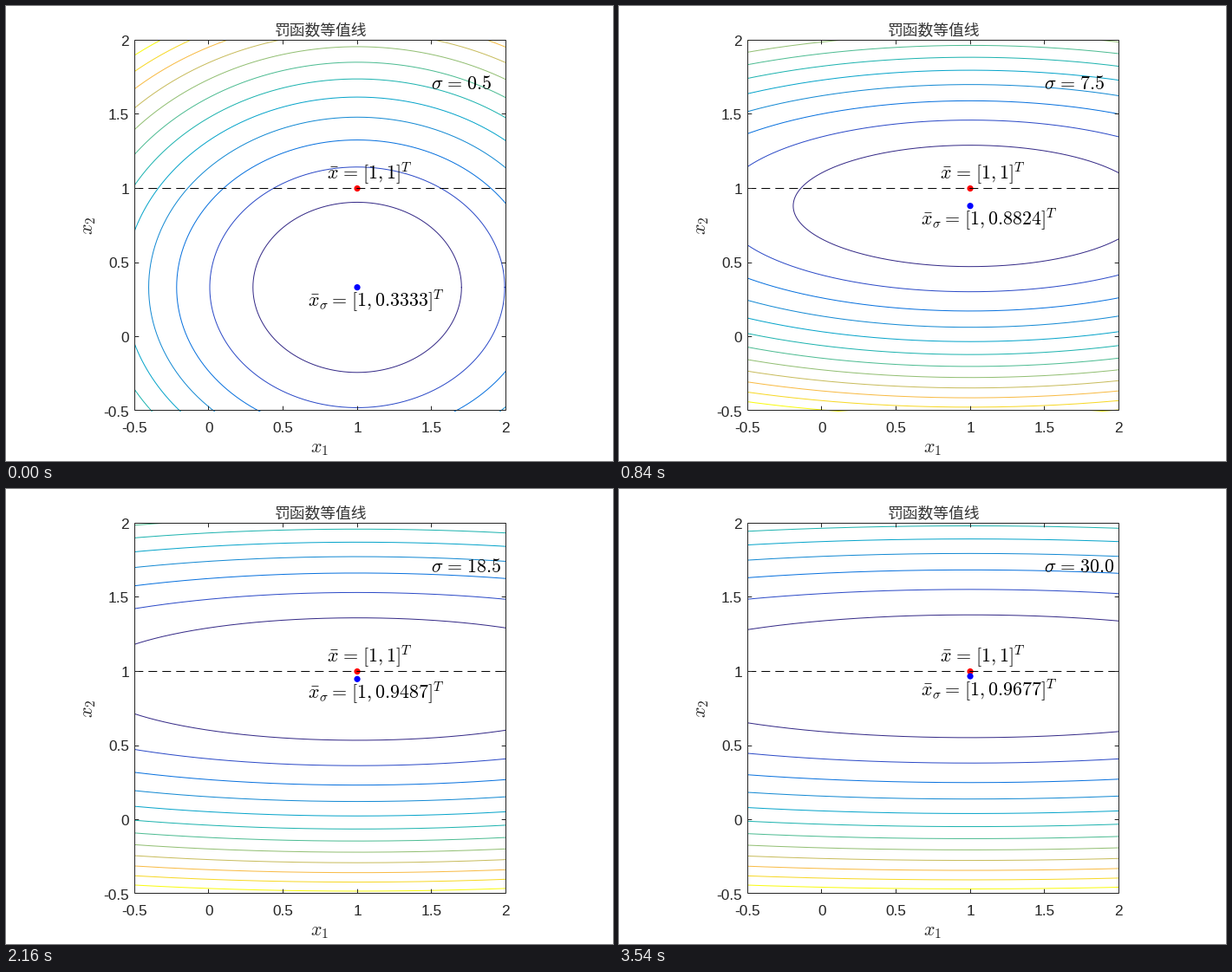
Write a matplotlib script that moves like this. It is 700 by 525 pixels and loops after 3600 ms.

```python
import numpy as np
import matplotlib.pyplot as plt
from matplotlib.animation import FuncAnimation
from matplotlib.patches import Circle, Rectangle

W, H, DPI = 700, 525, 100
PX = 72 / DPI                                   # points per pixel
LEFT, RIGHT, TOP, BOTTOM = 148.31, 576.19, 39.375, 467.25    # data area
BOX = (148.5, 576.5, 39.5, 466.5)               # frame, on pixel centres
LO, HI = -0.5, 2.0
FRAMES, INTERVAL = 60, 60
LEVELS = 12
INK = "#262626"
LINE_COLORS = ["#352a87", "#2c4ac7", "#0871de", "#1389d3", "#06a4ca", "#1db3af",
               "#4dbc92", "#92bf73", "#c8bc5d", "#f8bb44", "#f7d826", "#f9fb0e"]
MATH = 22
EQ = r"=\hspace{0.116}"                         # TeX-wide relation spacing
WIDE_EQ = r"\hspace{0.116}" + EQ
POWER_T = r"\hspace{-0.07}{}^T"

plt.rcParams["mathtext.fontset"] = "cm"


def px(x):
    return LEFT + (x - LO) / (HI - LO) * (RIGHT - LEFT)


def py(y):
    return BOTTOM - (y - LO) / (HI - LO) * (BOTTOM - TOP)


fig = plt.figure(figsize=(W / DPI, H / DPI), dpi=DPI, facecolor="white")
ax = fig.add_axes([0, 0, 1, 1])
ax.set_xlim(0, W)
ax.set_ylim(H, 0)
ax.axis("off")


def line(xs, ys, color=INK, z=4, **kw):
    return ax.plot(xs, ys, color=color, lw=PX, zorder=z, snap=False, **kw)[0]


def label(x, y, s, size, color="black", **kw):
    return ax.text(x, y, s, fontsize=size * PX, color=color, zorder=6, **kw)


def dot(y, color, z):
    return ax.add_patch(Circle((px(1), py(y)), 3.6, fc=color, lw=0, zorder=z))


def pixel_centre(v):
    return np.floor(v) + 0.5


def draw_frame():
    x0, x1, y0, y1 = BOX
    ax.add_patch(Rectangle((x0, y0), x1 - x0, y1 - y0, fill=False,
                           ec=INK, lw=PX, zorder=4, snap=False))
    tick = 4.3
    font = dict(family="Liberation Sans", color=INK, va="baseline")
    for v in np.linspace(LO, HI, 6):
        x, y, s = px(v), py(v), f"{v:g}"
        if LO < v < HI:
            tx, ty = pixel_centre(x), pixel_centre(y)
            for edge, d in ((y0, tick), (y1, -tick)):
                line([tx, tx], [edge, edge + d])
            for edge, d in ((x0, tick), (x1, -tick)):
                line([edge, edge + d], [ty, ty])
        label(x, 492.5, s, 17.2, ha="center", **font)
        label(142, y + 6.4, s, 17.2, ha="right", **font)


draw_frame()
label(363.2, 26, "罚函数等值线", 17.8, "#333333", family="Noto Sans CJK JP",
      ha="center", va="center_baseline")
label(361.9, 511.3, "$x_1$", MATH, INK, ha="center", va="center")
label(95.6, 252.8, "$x_2$", MATH, INK, ha="center", va="center", rotation=90)
dot(1, "red", 3)
line([LEFT, RIGHT], [pixel_centre(py(1))] * 2, "black", z=3.5,
     dashes=(10, 6), dash_capstyle="butt")
label(370, 199.5, rf"$\bar{{x}}{WIDE_EQ}[1,1]{POWER_T}$", MATH, va="baseline")

clip = Rectangle((LEFT, TOP - 0.5), RIGHT - LEFT, BOTTOM - TOP + 1,
                 transform=ax.transData)
rings = [line([], [], c, z=2) for c in LINE_COLORS]
for ring in rings:
    ring.set_clip_path(clip)
minimum = dot(0, "blue", 8)
min_text = label(348, 0, "", MATH, va="baseline")
sigma_text = label(490, 95.5, "", MATH, va="baseline")

angle = np.linspace(0, 2 * np.pi, 721)


def update(i):
    # penalty: (x1-1)^2 + x2^2 + sigma (x2-1)^2
    sigma = 0.5 * (i + 1)
    best = sigma / (1 + sigma)
    far = max(HI - best, best - LO)
    step = ((LO - 1) ** 2 + (1 + sigma) * far ** 2) / (LEVELS + 1)
    for k, ring in enumerate(rings, 1):
        r = np.sqrt(k * step)
        x, y = 1 + r * np.cos(angle), best + r / np.sqrt(1 + sigma) * np.sin(angle)
        inside = (x >= LO) & (x <= HI) & (y >= LO) & (y <= HI)
        ring.set_data(px(x), py(y))
        ring.set_visible(inside.any())
    minimum.center = px(1), py(best)
    min_text.set_y(py(best) + 22.4)
    min_text.set_text(rf"$\bar{{x}}_\sigma{EQ}[1,{best:.4f}]{POWER_T}$")
    sigma_text.set_text(rf"$\sigma{WIDE_EQ}{sigma:.1f}$")
    return [*rings, minimum, min_text, sigma_text]


anim = FuncAnimation(fig, update, frames=FRAMES, interval=INTERVAL,
                     repeat=True, repeat_delay=0, blit=False)
plt.show()
```
